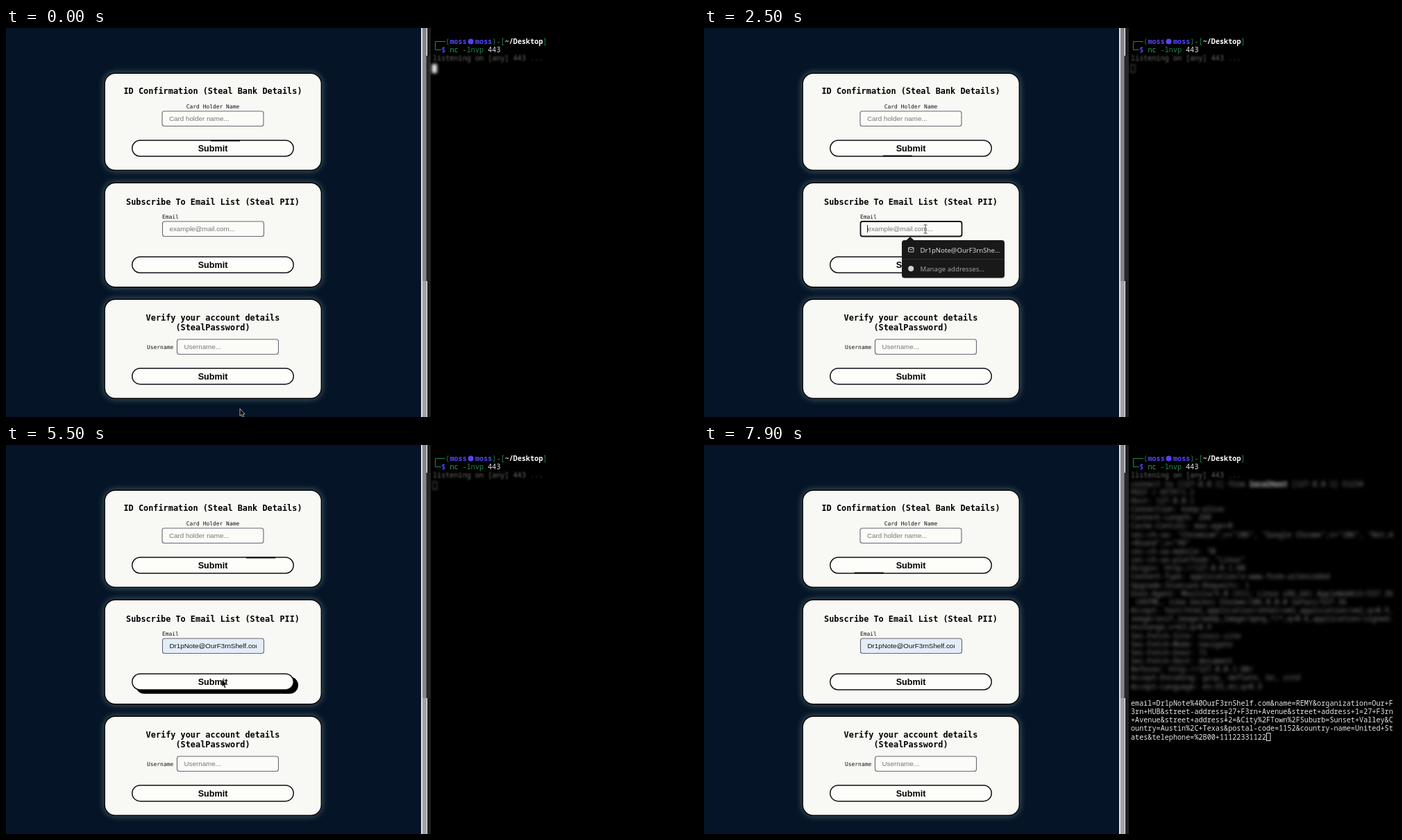
Recreate the animation shown at these times as an HTML page with a canvas. Size 997 by 561 pixels, loop 8 s.

```html
<!DOCTYPE html>
<html lang="en">
<head>
<meta charset="utf-8">
<title>Autofill demo</title>
<style>
html, body { margin: 0; width: 100%; height: 100%; overflow: hidden; background: #000; }
canvas { display: block; }
</style>
</head>
<body>
<canvas id="stage" width="997" height="561"></canvas>
<script>
const W = 997, H = 561, LOOP = 8000;
const MONO = '"DejaVu Sans Mono", monospace';
const SANS = '"Liberation Sans", Arial, sans-serif';
const TERM = '10.16px "Noto Sans Mono", monospace';
const CELL = 6.096, LINE = 12.17, TERM_X = 615;
const OUTPUT_AT = 5700, FILL_AT = 3300, FOCUS_AT = 2000, BLUR_AT = 5350;
const MAIL = 'Dr1pNote@OurF3rnShelf.com';

const headers = [
  'connect to [127.0.0.1] from localhost [127.0.0.1] 51234',
  'POST / HTTP/1.1', 'Host: 127.0.0.1', 'Connection: keep-alive',
  'Content-Length: 288', 'Cache-Control: max-age=0',
  'sec-ch-ua: "Chromium";v="106", "Google Chrome";v="106", "Not;A',
  '=Brand";v="99"', 'sec-ch-ua-mobile: ?0', 'sec-ch-ua-platform: "Linux"',
  'Origin: http://127.0.0.1:80',
  'Content-Type: application/x-www-form-urlencoded',
  'Upgrade-Insecure-Requests: 1',
  'User-Agent: Mozilla/5.0 (X11; Linux x86_64) AppleWebKit/537.36',
  ' (KHTML, like Gecko) Chrome/106.0.0.0 Safari/537.36',
  'Accept: text/html,application/xhtml+xml,application/xml;q=0.9,',
  'image/avif,image/webp,image/apng,*/*;q=0.8,application/signed-',
  'exchange;v=b3;q=0.9', 'Sec-Fetch-Site: cross-site',
  'Sec-Fetch-Mode: navigate', 'Sec-Fetch-User: ?1',
  'Sec-Fetch-Dest: document', 'Referer: http://127.0.0.1:80/',
  'Accept-Encoding: gzip, deflate, br, zstd', 'Accept-Language: en-US,en;q=0.9'
];
const body = [
  'email=Dr1pNote%40OurF3rnShelf.com&name=REMY&organization=Our+F',
  '3rn+HUB&street-address=27+F3rn+Avenue&street+address+1=27+F3rn',
  '+Avenue&street+address+2=&City%2FTown%2FSuburb=Sunset+Valley&C',
  'ountry=Austin%2C+Texas&postal-code=1152&country-name=United+St',
  'ates&telephone=%2B00+11122331122'
];

// Pointer path: time, x, y
const path = [
  [0, 337, 549], [200, 337, 549], [900, 334, 420], [1400, 322, 329],
  [1900, 319, 290], [2700, 319, 290], [3200, 322, 320], [4000, 327, 313],
  [4700, 327, 313], [5150, 311, 338], [6500, 311, 338], [7400, 752, 392], [LOOP, 752, 392]
];

const ctx = document.getElementById('stage').getContext('2d');
const clamp = v => Math.max(0, Math.min(1, v));
const ease = v => v * v * (3 - 2 * v);

function layer(draw) {
  const c = document.createElement('canvas');
  c.width = W; c.height = H;
  draw(c.getContext('2d'));
  return c;
}

function text(g, str, x, y, font, color, align = 'left') {
  g.font = font;
  g.fillStyle = color;
  g.textAlign = align;
  g.fillText(str, x, y);
}

function rect(g, x, y, w, h, color) {
  g.fillStyle = color;
  g.fillRect(x, y, w, h);
}

function box(g, x, y, w, h, r, fill, stroke, width = 1) {
  g.beginPath();
  g.roundRect(x, y, w, h, r);
  if (fill) { g.fillStyle = fill; g.fill(); }
  if (stroke) { g.strokeStyle = stroke; g.lineWidth = width; g.stroke(); }
}

const row = k => 23 + LINE * k;
const term = (g, str, col, k, color, bold = '') =>
  text(g, str, TERM_X + col * CELL, row(k), bold + TERM, color);

function card(g, y, h) {
  g.save();
  g.shadowColor = 'rgba(125, 150, 150, .6)';
  g.shadowBlur = 10;
  box(g, 141.5, y, 313.5, h, 16, '#000');
  g.restore();
  box(g, 142.9, y + 1.4, 310.7, h - 2.8, 14.7, '#f8f8f5');
}

function input(g, x, y, hint, fill = '#fbfbf8', width = 1.1) {
  box(g, x, y, 146, 21.5, 3, fill, width > 1.5 ? '#111' : '#686874', width);
  if (hint) text(g, hint, x + 10, y + 14, '9.8px ' + SANS, '#777');
}

function button(g, y, hover = 0) {
  if (hover > 0) box(g, 181 + 6 * hover, y - 0.7 + 5 * hover, 234, 24.4, 12.2, '#000');
  box(g, 181.8, y, 232.4, 23, 11.5, '#fdfdfa', '#101014', 1.5);
  text(g, 'Submit', 298, y + 15.8, 'bold 12.6px ' + SANS, '#000', 'center');
}

const backdrop = layer(g => {
  rect(g, 0, 0, W, H, '#000');
  rect(g, 0, 0, 598, H, '#051527');
  rect(g, 598, 0, 2, H, '#e4e4e4');
  rect(g, 600, 0, 5.5, 365, '#85858c');
  rect(g, 600, 365, 5.5, 196, '#a2a2a8');
  rect(g, 605.5, 0, 1.5, H, '#f0f0f0');
  rect(g, 607, 0, 5, H, '#202024');
  rect(g, 605.5, 40, 6.5, 325, '#26262a');

  card(g, 64.5, 141.5);
  card(g, 222.5, 152);
  card(g, 390.5, 144.5);
  const title = 'bold 11.86px ' + MONO, label = '7.95px ' + MONO;
  [['ID Confirmation (Steal Bank Details)', 95.3], ['Subscribe To Email List (Steal PII)', 254.5],
   ['Verify your account details', 422], ['(StealPassword)', 436]]
    .forEach(([s, y]) => text(g, s, 298, y, title, '#000', 'center'));
  text(g, 'Card Holder Name', 298, 115.5, label, '#111', 'center');
  text(g, 'Email', 225, 274.5, label, '#111');
  text(g, 'Username', 203, 462.7, label, '#111');
  input(g, 225, 120, 'Card holder name...');
  input(g, 246.5, 449, 'Username...');
  button(g, 162);

  const green = '#238a45', violet = '#5145f5';
  g.strokeStyle = green;
  g.lineWidth = 1;
  g.beginPath();
  g.moveTo(633, 19.5); g.lineTo(618.5, 19.5); g.lineTo(618.5, 31.5); g.lineTo(627, 31.5);
  g.stroke();
  term(g, '(', 3, 0, green);
  term(g, 'moss', 4, 0, violet, 'bold ');
  g.beginPath();
  g.arc(669.6, 19.6, 4, 0, 7);
  g.fillStyle = violet;
  g.fill();
  term(g, 'moss', 10, 0, violet, 'bold ');
  term(g, ')-[', 14, 0, green);
  term(g, '~/Desktop', 17, 0, '#fff', 'bold ');
  term(g, ']', 26, 0, green);
  term(g, '$', 2, 1, violet, 'bold ');
  term(g, 'nc', 4, 1, '#35a05a');
  term(g, '-lnvp', 7, 1, '#248a50');
  term(g, '443', 13, 1, '#e4e4e4');
});

const listening = layer(g => {
  g.filter = 'blur(1.2px)';
  term(g, 'listening on [any] 443 ...', 0, 2, '#6a6a64');
});

const output = layer(g => {
  g.filter = 'blur(2.6px)';
  headers.forEach((s, i) => term(g, s, 0, i + 3, '#86868a'));
  term(g, 'localhost', 28, 3, '#aaa', 'bold ');
  g.filter = 'none';
  body.forEach((s, i) => term(g, s, 0, i + 29, '#e6e6e6'));
  g.strokeStyle = '#e0e0e0';
  g.lineWidth = 1;
  g.strokeRect(810.5, 415.5, 5.5, 11);
});

const blurredCaret = layer(g => {
  g.filter = 'blur(2px)';
  rect(g, 613.5, 52, 7.5, 13, '#e8e8e8');
});

const hollowCaret = layer(g => {
  g.filter = 'blur(1.5px)';
  g.strokeStyle = '#555';
  g.strokeRect(615, 53, 6, 11);
});

// A dark dash that runs clockwise around the first button.
function runner(t) {
  const straight = 210, length = 2 * straight + 2 * Math.PI * 11.1;
  ctx.save();
  ctx.beginPath();
  ctx.moveTo(193, 162.4);
  ctx.lineTo(403, 162.4);
  ctx.arc(403, 173.5, 11.1, -Math.PI / 2, Math.PI / 2);
  ctx.lineTo(193, 184.6);
  ctx.arc(193, 173.5, 11.1, Math.PI / 2, Math.PI * 1.5);
  ctx.setLineDash([42, length - 42]);
  ctx.lineDashOffset = -(102 + t * 0.0983);
  ctx.lineWidth = 2;
  ctx.strokeStyle = '#101014';
  ctx.stroke();
  ctx.restore();
}

function hover(t, enter, leave) {
  return clamp(Math.min((t - enter) / 300, (leave + 300 - t) / 300));
}

function emailField(t) {
  const focused = t >= FOCUS_AT && t < BLUR_AT, filled = t >= FILL_AT;
  input(ctx, 225.5, 279, filled ? '' : 'example@mail.com...', filled ? '#e2edf9' : '#fbfbf8', focused ? 1.8 : 1.1);
  if (filled) {
    ctx.save();
    ctx.beginPath();
    ctx.rect(235, 280, 126, 20);
    ctx.clip();
    text(ctx, MAIL, 235.5, 293, '9.8px ' + SANS, '#111');
    ctx.restore();
  } else if (focused) {
    rect(ctx, 235, 284, 1, 11, '#222');
  }
}

function suggestions() {
  const font = '9.6px "Noto Sans", sans-serif';
  ctx.fillStyle = '#191919';
  ctx.beginPath();
  ctx.moveTo(291, 306.5); ctx.lineTo(297, 301); ctx.lineTo(303, 306.5);
  ctx.fill();
  box(ctx, 285, 306, 148, 54.5, 4, '#191919');
  rect(ctx, 285, 333, 148, 1, '#303030');
  box(ctx, 294.5, 316.5, 7.5, 6.5, 1, null, '#d0d0d0');
  ctx.beginPath();
  ctx.moveTo(294.5, 317); ctx.lineTo(298.2, 320); ctx.lineTo(302, 317);
  ctx.stroke();
  ctx.beginPath();
  ctx.arc(298.2, 347, 4, 0, 7);
  ctx.fillStyle = '#d0d0d0';
  ctx.fill();
  text(ctx, MAIL.slice(0, 19) + '…', 311.5, 323.5, font, '#dcdcdc');
  text(ctx, 'Manage addresses…', 311.5, 350.5, font, '#a2a2a2');
}

function pointer(t) {
  const i = Math.max(1, path.findIndex(p => p[0] > t));
  const [t0, x0, y0] = path[i - 1], [t1, x1, y1] = path[i];
  const k = ease((t - t0) / (t1 - t0));
  const x = x0 + (x1 - x0) * k, y = y0 + (y1 - y0) * k;
  const onDark = y > 535 || x > 455;
  ctx.save();
  ctx.translate(x, y);
  ctx.lineWidth = 1;
  if (x > 612 || (x < 371 && y > 279 && y < 301)) {
    ctx.strokeStyle = x > 612 ? '#b0b0b0' : '#555';
    ctx.beginPath();
    ctx.moveTo(-2.5, -6); ctx.lineTo(2.5, -6);
    ctx.moveTo(0, -6); ctx.lineTo(0, 6);
    ctx.moveTo(-2.5, 6); ctx.lineTo(2.5, 6);
    ctx.stroke();
  } else if (t < 1460 && ((y > 327 && y < 353) || (y > 490 && y < 514))) {
    box(ctx, 0, 0, 3, 8, 1.5, '#080808');
    box(ctx, 0.5, 4, 7.5, 7.5, 2, '#080808');
    rect(ctx, -1, 4, 3, 3, '#080808');
  } else {
    ctx.beginPath();
    [[0, 0], [0, 10.5], [2.3, 8.5], [4, 12.5], [5.8, 11.7], [4.1, 8], [7.2, 7.8]]
      .forEach(p => ctx.lineTo(...p));
    ctx.closePath();
    ctx.fillStyle = '#080808';
    ctx.fill();
    ctx.strokeStyle = onDark ? '#d0d0c8' : 'rgba(255,255,255,.5)';
    ctx.lineWidth = 0.8;
    ctx.stroke();
  }
  ctx.restore();
}

function frame(now) {
  const t = now % LOOP;
  ctx.drawImage(backdrop, 0, 0);
  runner(t);
  emailField(t);
  button(ctx, 330, Math.max(hover(t, 1250, 1400), hover(t, 4980, 6620)));
  button(ctx, 490.7, hover(t, 450, 540));
  if (t >= FOCUS_AT + 100 && t < FILL_AT) suggestions();
  ctx.drawImage(listening, 0, 0);
  ctx.drawImage(t >= OUTPUT_AT ? output : t < FOCUS_AT ? blurredCaret : hollowCaret, 0, 0);
  pointer(t);
  requestAnimationFrame(frame);
}
requestAnimationFrame(frame);
</script>
</body>
</html>
```
